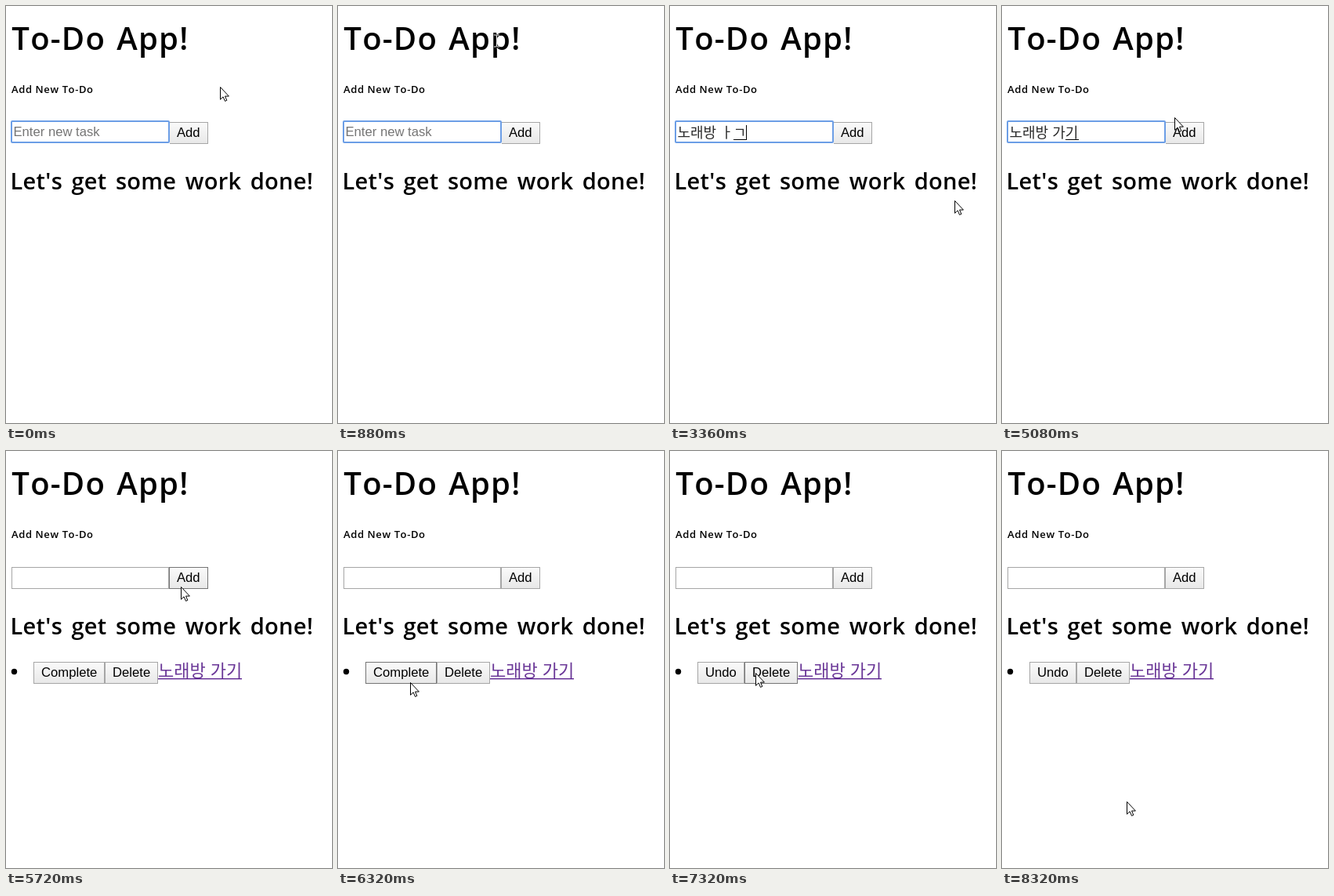
Recreate the animation shown at these times as an HTML page. Size 416 by 532 pixels, loop 9.04 s.

```html
<!DOCTYPE html>
<html lang="en">
<head>
<meta charset="utf-8">
<title>To-Do App</title>
<style>
  html, body { margin: 0; width: 100%; height: 100%; overflow: hidden; background: #fff; }
  svg { display: block; }
  text { white-space: pre; }
  .head { font-family: "Open Sans", "Noto Sans", sans-serif; font-weight: 600; font-kerning: none; }
  .h1 { font-size: 40px; letter-spacing: 1.2px; word-spacing: 2.7px; }
  .h2 { font-size: 29px; letter-spacing: .3px; word-spacing: 3.5px; }
  .h5 { font-size: 13px; letter-spacing: .6px; }
  .ui { font: 16.67px "Liberation Sans", Arial, sans-serif; }
  .ko { font-family: "Noto Sans CJK KR", "Noto Sans CJK JP", sans-serif; font-weight: 300; word-spacing: 1px; }
  .typed { font-size: 18px; fill: #2a2a2a; }
  .link { font-size: 22px; fill: #6a3797; }
  .button rect { fill: url(#face); stroke: #a6a6a6; }
  .button.hover rect { stroke: #757575; }
  .beam { fill: none; stroke: #fff; mix-blend-mode: difference; }
  .hidden { display: none; }
</style>
</head>
<body>
<svg width="416" height="532" viewBox="0 0 416 532">
  <defs>
    <linearGradient id="face" x2="0" y2="1">
      <stop offset="0" stop-color="#fafafa"/>
      <stop offset="1" stop-color="#e8e8e8"/>
    </linearGradient>
  </defs>
  <rect width="416" height="532" fill="#fff"/>
  <text class="head h1 editable" x="7.3" y="55.5">To-Do App!</text>
  <text class="head h5 editable" x="7" y="111">Add New To-Do</text>
  <text class="head h2 editable" x="5.6" y="234">Let's get some work done!</text>

  <rect class="editable" x="7.5" y="148.5" width="200" height="27" fill="#fff" stroke="#a6a6a6"/>
  <g class="button" id="add"><rect x=".5" y=".5" width="49" height="27"/><text class="ui" x="10" y="19">Add</text></g>
  <g id="focus">
    <path d="M6 146H209V177H6Z" fill="#fff"/>
    <rect x="7" y="147" width="201" height="27" rx="1" fill="#fff" stroke="#6c9ee6" stroke-width="2"/>
    <text class="ui" id="hint" x="9.5" y="166" fill="#757575">Enter new task</text>
    <text class="ko typed" id="typed" x="9.5" y="167.5"></text>
    <rect id="compose" y="170" height="1"/>
    <rect id="caret" y="152" width="1" height="19"/>
  </g>

  <g id="item">
    <circle cx="10.5" cy="281.5" r="3.7"/>
    <g class="button" id="toggle"><rect x=".5" y=".5" height="27"/><text class="ui" x="10" y="19"></text></g>
    <g class="button" id="delete"><rect x=".5" y=".5" width="67" height="27"/><text class="ui" x="10" y="19">Delete</text></g>
    <g id="link">
      <text class="ko link" y="288">노래방 가기</text>
      <rect y="290" width="107" height="1.3" fill="#551a8b"/>
    </g>
  </g>

  <path class="beam" id="beam" d="M-3.5-7.5H-1L0-6.5L1-7.5H3.5M0-6.5V6.5M-3.5 7.5H-1L0 6.5L1 7.5H3.5"/>
  <path id="arrow" fill="#fff" stroke="#000" d="M.5 .5V16.3L4.1 12.9L6.5 18.4L8.8 17.4L6.5 12.1H11.4Z"/>
</svg>
<script>
const LOOP = 9040, TICK = 40;
const CARET_ON = 2160, CARET_OFF = 4280, ADDED = 5400, COMPLETED = 6800;

// pointer moves: each starts where the last one ended; bow bends the path sideways
const home = { x: 273, y: 103 };
const moves = [
  { from: 0, to: 880, x: 202, y: 44, bow: -1.7 },
  { from: 880, to: 1320, x: 123, y: 152, bow: .9 },
  { from: 1440, to: 1600, x: 110, y: 157, bow: 0 },
  { from: 1720, to: 1920, x: 363, y: 248, bow: 0 },
  { from: 4680, to: 5080, x: 220, y: 142, bow: .5 },
  { from: 5080, to: 5240, x: 224, y: 172, bow: 0 },
  { from: 5680, to: 6320, x: 92, y: 295, bow: 0 },
  { from: 6600, to: 7320, x: 109, y: 283, bow: 0 },
  { from: 7680, to: 8320, x: 159, y: 447, bow: 0 }
];

// bursts of typing; the last character of each state is being composed
const bursts = [
  { at: 2360, gap: 100, states: ["ㄴ", "노", "놀", "노래"] },
  { at: 2880, gap: 80, states: ["노랩", "노래바", "노래방", "노래방 "] },
  { at: 3320, gap: 40, states: ["노래방 ㅏ", "노래방 ㅏㄱ"] },
  { at: 3720, gap: 120, states: ["노래방 ㅏ", "노래방 "] },
  { at: 4040, gap: 70, states: ["노래방 ㄱ", "노래방 가", "노래방 각", "노래방 가기"] }
];

const $ = id => document.getElementById(id);
const show = (id, on) => $(id).classList.toggle("hidden", !on);
const place = (id, x, y) => $(id).setAttribute("transform", `translate(${x} ${y})`);
const inside = (p, b) => p.x >= b.x && p.x < b.x + b.width && p.y >= b.y && p.y < b.y + b.height;
const textAreas = [...document.querySelectorAll(".editable")].map(e => e.getBBox());

function pointerAt(t) {
  let p = home;
  for (const m of moves) {
    if (t < m.from) break;
    const u = Math.min(1, (t - m.from) / (m.to - m.from));
    const k = u * u * (3 - 2 * u), bend = m.bow * Math.sin(Math.PI * k);
    const dx = m.x - p.x, dy = m.y - p.y;
    p = { x: p.x + dx * k - dy * bend, y: p.y + dy * k + dx * bend };
  }
  return { x: Math.round(p.x), y: Math.round(p.y) };
}

function valueAt(t) {
  const burst = bursts.filter(b => b.at <= t).pop();
  if (!burst) return "";
  const i = Math.floor((t - burst.at) / burst.gap);
  return burst.states[Math.min(i, burst.states.length - 1)];
}

function drawButton(id, x, y, width, pointer) {
  place(id, x, y);
  $(id).classList.toggle("hover", inside(pointer, { x, y, width, height: 28 }));
}

function drawField(t) {
  show("focus", t < ADDED);
  if (t >= ADDED) return;
  const value = valueAt(t), typed = $("typed"), left = 9.5;
  const composing = value !== "" && !value.endsWith(" ");
  typed.textContent = value;
  show("hint", !value);
  show("caret", t >= CARET_ON && t < CARET_OFF);
  show("compose", composing);
  const end = value ? left + typed.getComputedTextLength() : left;
  $("caret").setAttribute("x", Math.round(end));
  if (composing) {
    const n = value.length - 1;
    const start = n ? left + typed.getSubStringLength(0, n) : left;
    $("compose").setAttribute("x", Math.round(start));
    $("compose").setAttribute("width", Math.round(end - start));
  }
}

function drawItem(t, pointer) {
  const done = t >= COMPLETED, w = done ? 60 : 91;
  show("item", t >= ADDED);
  $("toggle").querySelector("rect").setAttribute("width", w - 1);
  $("toggle").querySelector("text").textContent = done ? "Undo" : "Complete";
  drawButton("toggle", 35, 269, w, pointer);
  drawButton("delete", 35 + w, 269, 68, pointer);
  place("link", 103 + w, 0);
}

function render(t) {
  const pointer = pointerAt(t);
  const overText = textAreas.some(a => inside(pointer, a));
  drawButton("add", 208, 148, 50, pointer);
  drawField(t);
  drawItem(t, pointer);
  show("beam", overText);
  show("arrow", !overText);
  place("beam", pointer.x + .5, pointer.y + .5);
  place("arrow", pointer.x, pointer.y);
}

const start = performance.now();
function frame() {
  const t = (performance.now() - start) % LOOP;
  render(Math.floor(t / TICK) * TICK);
  requestAnimationFrame(frame);
}
frame();
</script>
</body>
</html>
```
